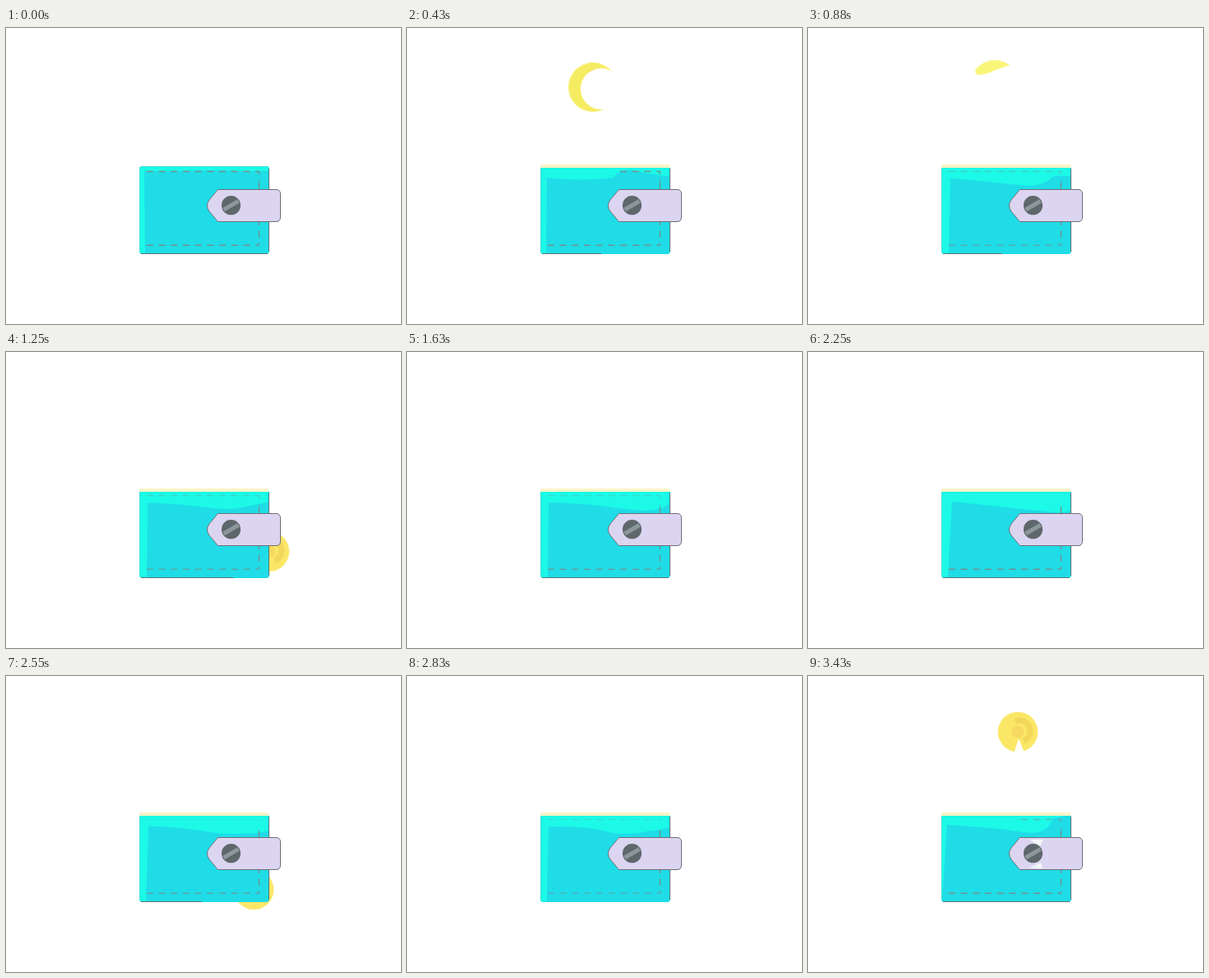
An HTML page that plays this animation: 480 by 360 pixels, repeating every 3460 ms.

```html
<!DOCTYPE html>
<html lang="en">
<head>
<meta charset="utf-8">
<title>Wallet</title>
<style>
html, body { margin: 0; width: 100%; height: 100%; overflow: hidden; background: #fff; }
svg { display: block; width: 480px; height: 360px; }
.anim { animation: 3460ms linear infinite; }
.stitch path { fill: none; stroke: #74908f; stroke-width: 1.4; stroke-dasharray: 8 6.7; }

#coin { animation-name: coin; }
@keyframes coin {
  0%, .86% { opacity: 0; transform: translate(255px, 68px); }
  .87% { opacity: 1; transform: translate(255px, 68px); }
  12.43%, 16% { opacity: 1; transform: translate(226px, 72px) scale(1.23); }
  16.01% { opacity: 0; transform: translate(226px, 72px) scale(1.23); }
  16.79% { opacity: 0; transform: translate(226px, 200px) scale(1.23); }
  16.8% { opacity: 1; transform: translate(226px, 200px) scale(1.23); }
  20% { opacity: 1; transform: translate(226px, 62px) scale(1.23); }
  25.43%, 31% { opacity: 1; transform: translate(227px, 69px) scale(1.23); }
  31.01% { opacity: 0; transform: translate(227px, 69px); }
  33.19% { opacity: 0; transform: translate(285px, 205px); }
  33.2% { opacity: 1; transform: translate(285px, 205px); }
  35.5% { opacity: 1; transform: translate(327px, 225px); }
  37.7% { opacity: 1; transform: translate(303px, 284px); }
  39.7% { opacity: 1; transform: translate(243px, 308px); }
  41.7% { opacity: 1; transform: translate(184px, 284px); }
  44% { opacity: 1; transform: translate(160px, 225px); }
  46.2% { opacity: 1; transform: translate(195px, 205px); }
  46.21% { opacity: 0; transform: translate(195px, 205px); }
  65.59% { opacity: 0; transform: translate(245px, 200px); }
  65.6% { opacity: 1; transform: translate(245px, 200px); }
  68% { opacity: 1; transform: translate(245px, 102px); }
  70.5% { opacity: 1; transform: translate(270px, 200px); }
  73% { opacity: 1; transform: translate(325px, 240px); }
  75.5% { opacity: 1; transform: translate(243px, 308px); }
  78% { opacity: 1; transform: translate(165px, 240px); }
  80.3% { opacity: 1; transform: translate(200px, 215px); }
  80.31% { opacity: 0; transform: translate(200px, 215px); }
  82.69% { opacity: 0; transform: translate(220px, 220px); }
  82.7% { opacity: 1; transform: translate(220px, 220px); }
  85% { opacity: 1; transform: translate(175px, 250px); }
  88% { opacity: 1; transform: translate(243px, 308px); }
  91% { opacity: 1; transform: translate(325px, 240px); }
  93.5% { opacity: 1; transform: translate(280px, 175px); }
  95.5% { opacity: 1; transform: translate(255px, 145px); }
  98.7%, 100% { opacity: 1; transform: translate(255px, 68px); }
}

#disc { animation-name: disc; }
@keyframes disc {
  0%, 12.43% { fill: #f6ec62; } 25.43%, 31% { fill: #f9f579; } 33%, 100% { fill: #fbe766; }
}
#relief { animation-name: relief; }
@keyframes relief { 0%, 16% { opacity: 1; } 20%, 31% { opacity: 0; } 33%, 100% { opacity: 1; } }

#bite { animation-name: bite; }
@keyframes bite {
  0%, 5% { transform: translate(312px, 78px); }
  12.43% { transform: translate(236px, 74px); }
  15.9%, 16.5% { transform: translate(226px, 72px) scale(1.25); }
  16.51%, 100% { transform: translate(420px, 72px); }
}

#wipe { animation-name: wipe; }
@keyframes wipe {
  0%, 17.5% { opacity: 0; transform: translateY(70px); }
  17.51% { opacity: 1; transform: translateY(70px); }
  25.43% { opacity: 1; transform: none; }
  30%, 31.5% { opacity: 1; transform: translateY(-26px); }
  31.51%, 100% { opacity: 0; transform: translateY(-26px); }
}

#light { animation-name: light; }
@keyframes light {
  0%, .8% { d: path("M162 168H320V174Q300 174 282 174Q262 173 250 173Q215 174 168 174L169 274H162Z"); }
  12.43% { d: path("M162 168H320V181Q300 178 282 175Q262 168 250 182Q215 187 170 182L169 274H162Z"); }
  25.43% { d: path("M162 168H320V181Q302 178 296 182Q286 192 265 192Q215 186 173 183L171 274H162Z"); }
  47.1% { d: path("M162 168H320V183Q312 192 292 193Q270 192 250 189Q215 184 172 183L171 274H162Z"); }
  65% { d: path("M162 168H320V192Q312 196 300 195Q270 192 250 190Q215 186 175 182L170 274H162Z"); }
  81.8% { d: path("M162 168H320V184Q306 188 295 188Q275 194 250 191Q220 182 172 183L170 274H162Z"); }
  99.13%, 100% { d: path("M162 168H320V170Q308 170 297 174Q292 194 262 190Q225 184 169 181L163 274H162Z"); }
}

#cream { animation-name: cream; }
@keyframes cream { 0%, .86% { opacity: 0; } 6%, 100% { opacity: 1; } }

#base-line { stroke-dasharray: 154; animation-name: base-line; }
@keyframes base-line {
  0%, .86% { stroke-dashoffset: 0; } 12.43%, 25.43% { stroke-dashoffset: 82; }
  47.1%, 65% { stroke-dashoffset: 0; } 81.8% { stroke-dashoffset: 154; } 99%, 100% { stroke-dashoffset: 0; }
}

#top-left { animation-name: top-left; }
@keyframes top-left {
  0%, .86% { opacity: 1; } 12.43% { opacity: 0; } 25.43% { opacity: .4; }
  47.1% { opacity: .25; } 65% { opacity: 0; } 81.8% { opacity: .2; } 99%, 100% { opacity: 0; }
}
#top-right { animation-name: top-right; }
@keyframes top-right {
  0%, 12.43% { opacity: 1; } 25.43% { opacity: .4; } 47.1% { opacity: .25; }
  65% { opacity: 0; } 81.8% { opacity: .15; } 99%, 100% { opacity: .5; }
}
#bottom { animation-name: bottom; }
@keyframes bottom {
  0%, 12.43% { opacity: 1; } 25.43% { opacity: .65; } 47.1% { opacity: .85; }
  65% { opacity: 1; } 81.8% { opacity: .5; } 99%, 100% { opacity: 1; }
}
.late { animation-name: late; }
@keyframes late { 0%, 98.6% { opacity: 0; } 98.7%, 100% { opacity: 1; } }
</style>
</head>
<body>
<svg viewBox="0 0 480 360">
  <clipPath id="body"><rect x="162" y="168" width="158" height="107" rx="4"/></clipPath>

  <g id="coin" class="anim">
    <circle id="disc" class="anim" r="24.3"/>
    <g id="relief" class="anim">
      <path d="M-3-13A13 13 0 1 1 7 11" fill="none" stroke="#f3d75a" stroke-width="7"/>
      <circle r="7.5" fill="#f6d962"/>
    </g>
    <path class="anim late" d="M-5 26L1 8L8 25Z" fill="#fff"/>
  </g>
  <circle id="bite" class="anim" r="25" fill="#fff"/>
  <path id="wipe" class="anim" d="M190 52H203.500V55Q205 57 210 57Q219 56 226 52Q234 49 243 46H290V130H190Z" fill="#fff"/>

  <rect x="162" y="168" width="158" height="107" rx="4" fill="#1fdce7"/>
  <path id="light" class="anim" clip-path="url(#body)" fill="#1cf9e7"
    d="M162 168H320V174Q300 174 282 174Q262 173 250 173Q215 174 168 174L169 274H162Z"/>
  <path d="M162.500 272V171Q162.500 168.500 165 168.500H317" fill="none" stroke="#8fb9b8" opacity=".4"/>
  <path id="cream" class="anim" d="M162 170V168Q162 166 164 166H317Q319 166 320 170Z" fill="#fbf4c6"/>
  <path d="M319.500 171V272" stroke="#5c7577"/>
  <path id="base-line" class="anim" d="M164 274.500H318" stroke="#5c7577"/>

  <g class="stitch">
    <path id="top-left" class="anim" d="M171 174.500H257"/>
    <path id="top-right" class="anim" d="M259 174.500H307.500V187"/>
    <path d="M307.500 188V264"/>
    <path id="bottom" class="anim" d="M171 264.300H307"/>
  </g>

  <path d="M257.500 196.500H329Q333.500 197 333.500 202V230Q333.500 235 329 235.500H257.500L247 223Q242 216 247 209Z"
    fill="#dcd5f1" stroke="#716d75"/>
  <path class="anim late" d="M269 199H286L282 207ZM269 233L283 227L285 234Z" fill="#f2f6fa"/>
  <circle cx="273.500" cy="215.700" r="11.600" fill="#5e676b"/>
  <path d="M264.500 221L282.500 210.500" stroke="#8b989b" stroke-width="5"/>
</svg>
</body>
</html>
```
